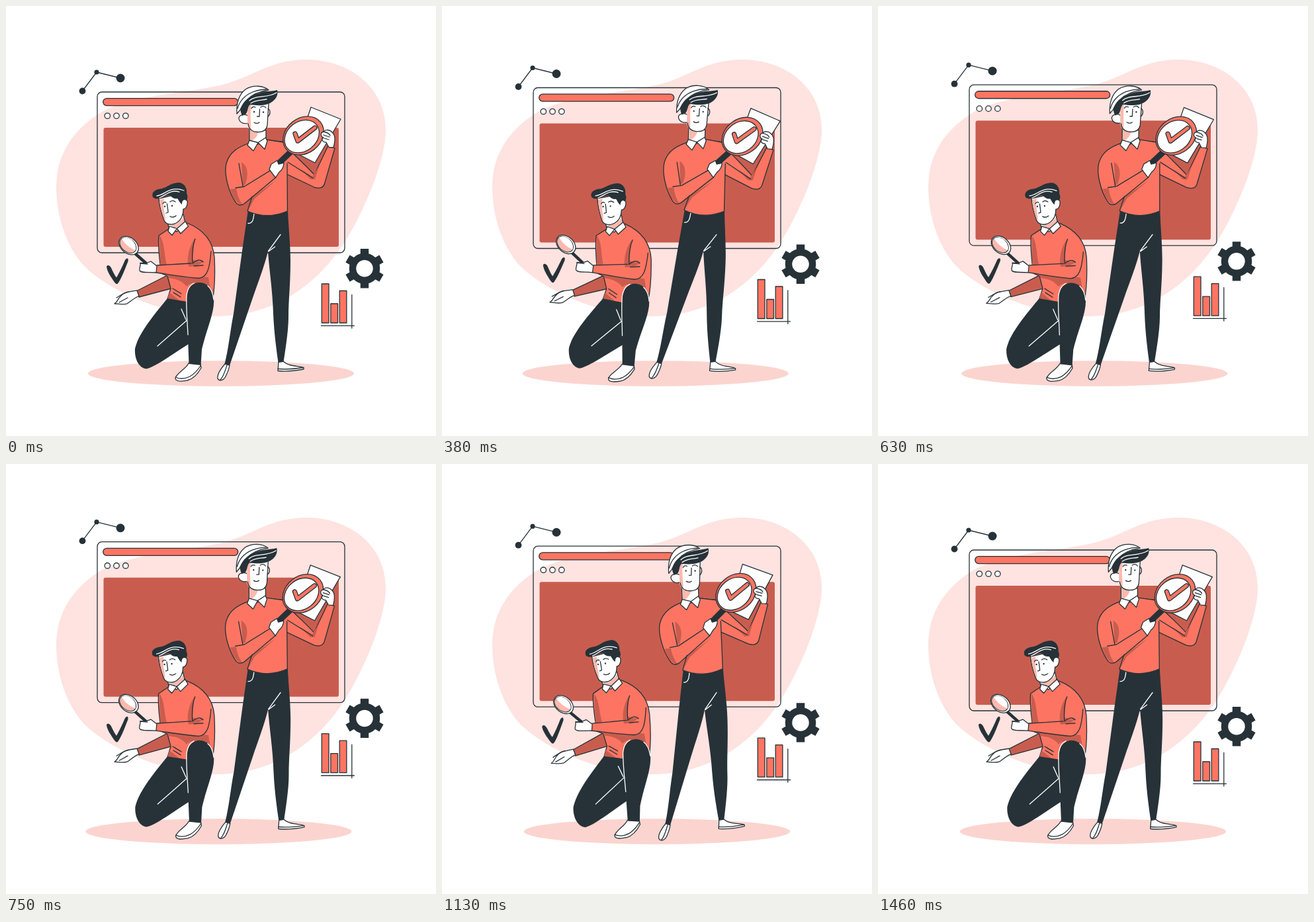
An HTML page for the animation above (1500 ms loop, 650x650 px).

```html
<!DOCTYPE html>
<html lang="en">
<head>
<meta charset="utf-8">
<title>Quality check</title>
<style>
  html, body { margin: 0; width: 100%; height: 100%; overflow: hidden; background: #fff; }
  svg { display: block; width: 100%; height: 100%; }
  .line { fill: none; stroke: #263238; stroke-width: 1.3; stroke-linecap: round; stroke-linejoin: round; }
  .white { fill: #fff; }
  .coral { fill: #fd7562; }
  .deep { fill: #c85d4f; }
  .blush { fill: #fdb9ae; stroke: none; }
  .shade { fill: #c85d4f; stroke: none; }
  .dark { fill: #263238; stroke: none; }
  .seam { stroke: #fff; }
  .bare { stroke: none; }
</style>
</head>
<body>
<svg viewBox="0 0 650 650">
  <path fill="#fee3e0" d="M455 81C515 81 574 120 574 188C574 240 530 337 497 378C455 432 395 469 318 469C245 469 160 434 118 393C90 362 76 316 76 273C76 224 103 185 145 160C190 136 260 133 318 121C370 111 395 81 455 81Z"/>
  <ellipse id="shadow" cx="325" cy="555.5" rx="201" ry="19.3" fill="#fcd4cf"/>

  <g id="floating" class="line">
    <rect x="138" y="130" width="374" height="243" rx="7"/>
    <rect class="coral" x="146.7" y="139.6" width="204" height="11" rx="5.5"/>
    <g class="white">
      <circle cx="153.3" cy="166" r="4.2"/>
      <circle cx="167" cy="166" r="4.2"/>
      <circle cx="180.8" cy="166" r="4.2"/>
    </g>
    <rect class="shade" x="147.5" y="184" width="355.5" height="180" rx="3"/>

    <path d="M115.5 128.5L137 100L173 109"/>
    <g class="dark">
      <circle cx="115.5" cy="128.5" r="4.9"/>
      <circle cx="137" cy="100" r="3.6"/>
      <circle cx="173" cy="109" r="6.5"/>
    </g>

    <path d="M542 367V426.4M516.500 382L567.500 411.400M516.500 411.400L567.500 382" style="stroke-width:12.5;stroke-linecap:butt"/>
    <circle class="white" cx="542" cy="396.700" r="18" style="stroke-width:10.500"/>

    <g class="coral">
      <rect x="477.3" y="420" width="10.7" height="59"/>
      <rect x="490.8" y="450" width="10.7" height="29"/>
      <rect x="504.2" y="430.5" width="10.7" height="48.5"/>
    </g>
    <path d="M476.500 483.3H526.5M522.8 436.5V487"/>
  </g>

  <g id="standing" class="line">
    <!-- sheet -->
    <path class="white" d="M461 153L506 171L467 237L438 222Z"/>
    <!-- shoes and trousers -->
    <path class="white" d="M331 541C325 548 319 556 320 563C322 568 329 566 332 560C335 554 337 549 338 543Z"/>
    <path d="M334 543C331 552 329 560 324 565"/>
    <path class="white" d="M412 538L411 551.5C425 553 440 551 450 549C452 545 440 545 436 544C428 543 423 541 419 537Z"/>
    <path d="M411 548.5C425 550 440 548 450 546.5"/>
    <path class="dark" d="M366 308L426 309C427 335 430 360 430 385C430 420 427 445 427 470C427 490 423 515 419.5 538L411.5 539C408 515 405 490 404 465C403 430 398 400 396 371C391 392 381 418 373 441L338 543.5L330.5 541C337 515 339 490 344 465L357 370Z"/>
    <path class="seam" d="M366 328.5C373 329 374 322 375 314M396.5 370.5L415 345.5M397 371L406.5 364"/>
    <!-- far arm -->
    <path class="coral" d="M395 203L424 206L433 222C445 234 457 245 466 255L487 211L497 215L482 267C480 276 473 276 466 274L424 254Z"/>
    <path class="shade" d="M445 246L463 258L474 240L467 262L460 262Z"/>
    <path d="M426 236L464 260"/>
    <!-- torso -->
    <path class="coral bare" d="M368 207C352 213 338 220 333 238C329 255 337 281 346 295C350 302 355 302 360 299L372 288L365 310C385 319 405 319 425.5 310L425 238L420 206L394 202Z"/>
    <path class="shade" d="M372 288L386 279L408 264L376 291L367 307ZM356 236C367 243 366 257 362 269L358 272ZM348 276C350 286 352 292 357 300C349 301 343 289 339 277Z"/>
    <path d="M394 202L420 206M425 238L425.5 310C405 319 385 319 365 310L372 288M368 207C352 213 338 220 333 238C329 255 337 281 346 295C350 302 355 302 360 299L408 259M352 238L358 272M347 275L360 273L399 249"/>
    <!-- neck, collar -->
    <path class="white" d="M368 183V206L381 209L393 200V188Z"/>
    <path class="blush" d="M369 186L381 191C380 198 374 203 369 205Z"/>
    <path class="white" d="M368 203L365 210.5L374 219L381 206.5L391 216.5L395 204L392.5 199L381 206.5Z"/>
    <!-- face -->
    <path class="white" d="M366 166C360 162 352 165 352 170C353 176 359 179 366 177Z"/>
    <path class="white bare" d="M365 148V179C366 187 372 190 380 190.5C390 191 394 187 395 180L397.5 146Z"/>
    <path class="blush" d="M365 149H371C368 162 371 176 370 187C367 184 365 180 365 176Z"/>
    <path d="M366 178C367 187 372 190 380 190.5C390 191 394 187 395 180L397 148"/>
    <path d="M371 155C372 152 375 152 377 153M385 153C387 151 391 151 393 154M383.5 156L383 167L379.5 167M375 176C378 178 381 177.5 383 176M396 155C400 157 400 164 396 167"/>
    <circle class="dark" cx="375" cy="160" r="1.2"/>
    <circle class="dark" cx="389" cy="160.5" r="1.2"/>
    <!-- hair and cap -->
    <path class="dark" d="M354 152C357 146 363 140 372 136C385 128 400 130 410 127C412 134 408 141 402 145C394 151 380 151 369 149C365 152 366 158 363 163L357 166C355 162 354 157 354 152Z"/>
    <path class="white" d="M349 163C348 147 352 134 362 126C373 119 389 120 397 127C383 129 371 135 364 142C358 147 356 153 354 157Z"/>
    <path d="M350 155C353 144 361 135 373 130C381 127 387 126 394 126"/>
    <path class="seam" d="M368 143C378 134 394 140 409 131M370 147C379 141 386 143 394 141"/>
    <!-- big magnifier -->
    <path d="M431 220L412 238" style="stroke-width:9;stroke-linecap:butt"/>
    <g transform="rotate(-38 449.5 196)">
      <ellipse class="coral" cx="449.5" cy="196" rx="33" ry="26.5"/>
      <ellipse class="white" cx="447" cy="195.5" rx="28.3" ry="22.3"/>
    </g>
    <path d="M437 193L441 204L467 184" style="stroke-width:7.3"/>
    <path d="M437 193L441 204L467 184" style="stroke-width:4.7;stroke:#fd7562"/>
    <!-- hands -->
    <path class="white" d="M398 247L401 239L410 233.5L412 239L420 237C420 243 417 248 413 251L407.5 259.5Z"/>
    <path class="white" d="M488 213.5L484 206C478 206 476 201 480 199C475 197 475 191 480 190C483 186 490 187 493 191C498 195 498 203 495 214Z"/>
    <path d="M480 190C485 191 489 193 490 196M480 195L489 198M481 200L488 202"/>
  </g>

  <g id="kneeling" class="line">
    <path class="dark" d="M152 394C154 390 158 393 159.5 397C162 402 164 407 167 410.5C172 402 177 391 180 384C183 380 185.5 381 184.5 386C180 397 175 411 169.5 419C167.5 421.5 166 420 164 417.5C159 410 153 402 152 394Z"/>
    <!-- far arm -->
    <path class="deep" d="M198 430.5L244 407L250 427L201 440Z"/>
    <path class="white" d="M164 450C170 446 168 443 174 438C178 433 185 432 198 430L201 438.5C194 441 188 447 183 450C176 452 170 450 164 450Z"/>
    <path d="M167 441C174 437 179 433 185 432M171 448L184 441"/>
    <!-- torso -->
    <path class="coral" d="M246 337L231 347C229 365 233 385 234 404L244 408L249 427L244 443L272 448L312 446C316 425 316 400 315 380C313 355 298 338 274 328Z"/>
    <path class="shade" d="M232 347C240 356 239 376 243 390L233 392ZM244 405L306 410L309 428C300 416 280 416 273 424C266 415 256 412 245 411ZM247 433L262 445L244 443Z"/>
    <path class="shade" d="M285 352C276 365 274 380 275 389L299 393C295 386 287 386 282 383Z"/>
    <path d="M252 427L265 435M253 433L264 440"/>
    <!-- near arm -->
    <path class="coral bare" d="M228 392L275 389L297 386L310 371C308 395 305 411 291 411.5C270 410 248 406 227 403Z"/>
    <path class="shade" d="M275 389L299 385C291 394 284 393 276 394Z"/>
    <path d="M286 352C282 362 281 375 282 389M228 392L280 389M282 389C287 384 294 382 298 387M284 393L298 392M310 371C308 395 305 411 291 411.5C270 410 248 406 227 403"/>
    <!-- shoe and trousers -->
    <path class="white" d="M276 540C272 549 257 555 256 563C257 569 268 567 274 566C283 564 290 556 295 547L294 541Z"/>
    <path d="M256 561C264 565 272 563 278 560C285 556 290 550 294 544"/>
    <path class="dark" d="M244 442L274 447L276 511C252 526 225 546 212 548.5C200 547 194 532 195 518C200 495 226 464 244 442Z"/>
    <path class="dark" d="M273 440C274 426 282 418 292 418C305 418 313 429 314 441C316 463 304 485 296 519L294.5 543L276.5 541L274 475Z"/>
    <path class="seam" d="M229 514L273 475.5M265 458L272 474M275 497C274 475 272 455 273 437C275 426 278 422 284 419M305 423C310 427 313 435 314 444"/>
    <!-- neck, collar -->
    <path class="white" d="M244 326L247 338L258 341L271 329L268 315Z"/>
    <path class="blush" d="M246 331C256 332 264 326 268 319L270 328L259 337Z"/>
    <path class="white" d="M247 333L245 340.5L251 346.5L258.5 336.5L264 344L275.5 333L271 325.5L258.5 336.5Z"/>
    <!-- face -->
    <path class="white" d="M231 291C232 305 236 316 239 324C242 331 252 332 259 327C265 323 268 316 268 307C272 307 275 301 274 295C273 291 268 292 266 294L258 285Z"/>
    <path class="blush" d="M232 293L239 291C236 302 241 314 241 325C236 316 233 304 232 293Z"/>
    <path d="M237 299C238 296 240 296 242 297M248 296C250 294 253 294 256 296M243.5 299C244 304 245 308 245 312L242 313M248 318C251 320 255 319 257 317"/>
    <circle class="dark" cx="240" cy="303" r="1.2"/>
    <circle class="dark" cx="251" cy="302" r="1.2"/>
    <path class="dark" d="M222 289C219 281 226 277 236 276C244 274 250 267 262 267C270 268 274 276 273 283C275 287 275 292 272 294C269 291 266 294 266 300C262 297 261 293 259 291C254 292 250 289 248 286C243 286 237 289 232 291C227 292 224 291 222 289Z"/>
    <path class="seam" d="M228 287C240 286 248 271 269 279M232 290C242 286 248 277 262 281"/>
    <!-- small magnifier -->
    <path d="M195 374L213 390" style="stroke-width:4.5"/>
    <g transform="rotate(40 185.5 362)">
      <ellipse class="white" cx="185.5" cy="362" rx="16.5" ry="11.8"/>
      <ellipse cx="184.5" cy="362.5" rx="14" ry="9.8" fill="#fdb9ae" style="stroke-width:1"/>
      <path class="white bare" d="M171 361C174 350 193 350 198 361C190 364 180 364 171 361Z"/>
    </g>
    <path class="white" d="M228 393L219 386L211 389L203 388.5C204 392 201 396 202 400C205 404 213 402 227 403Z"/>
    <path d="M203 389L214 390"/>
  </g>
</svg>
<script>
const LOOP = 1500, STEPS = 36;
const get = id => document.getElementById(id);
const [shadow, floating, standing, kneeling] = ["shadow", "floating", "standing", "kneeling"].map(get);

// Linear interpolation through [phase, value] keys
function keyed(keys, p) {
  const i = keys.findIndex(k => k[0] >= p);
  if (i < 1) return keys[0][1];
  const [p0, v0] = keys[i - 1], [p1, v1] = keys[i];
  return v0 + (v1 - v0) * (p - p0) / (p1 - p0);
}

const lift = [[0, 0], [.5, -13], [1, 0]];
const sway = [[0, 0], [.25, 2], [.75, -2], [1, 0]];
const shake = [0, -1, 2, -4, 4, -4, 4, -4, 2, -1, 0].map((v, i) => [i / 10, v * 1.3]);

const phase = step => (step + .5) / STEPS;
const fromRest = (keys, p) => keyed(keys, p) - keyed(keys, phase(0));

function draw(ms) {
  const p = phase(Math.floor((ms % LOOP + 4.9) * STEPS / LOOP) % STEPS);
  const angle = fromRest(sway, p);
  floating.setAttribute("transform", `translate(0 ${fromRest(lift, p)})`);
  shadow.setAttribute("transform", `translate(${fromRest(shake, p)} 0)`);
  standing.setAttribute("transform", `rotate(${angle} 413 343)`);
  kneeling.setAttribute("transform", `rotate(${angle} 234 418)`);
}

let start;
function tick(now) {
  start ??= now;
  draw(now - start);
  requestAnimationFrame(tick);
}
draw(0);
requestAnimationFrame(tick);
</script>
</body>
</html>
```
